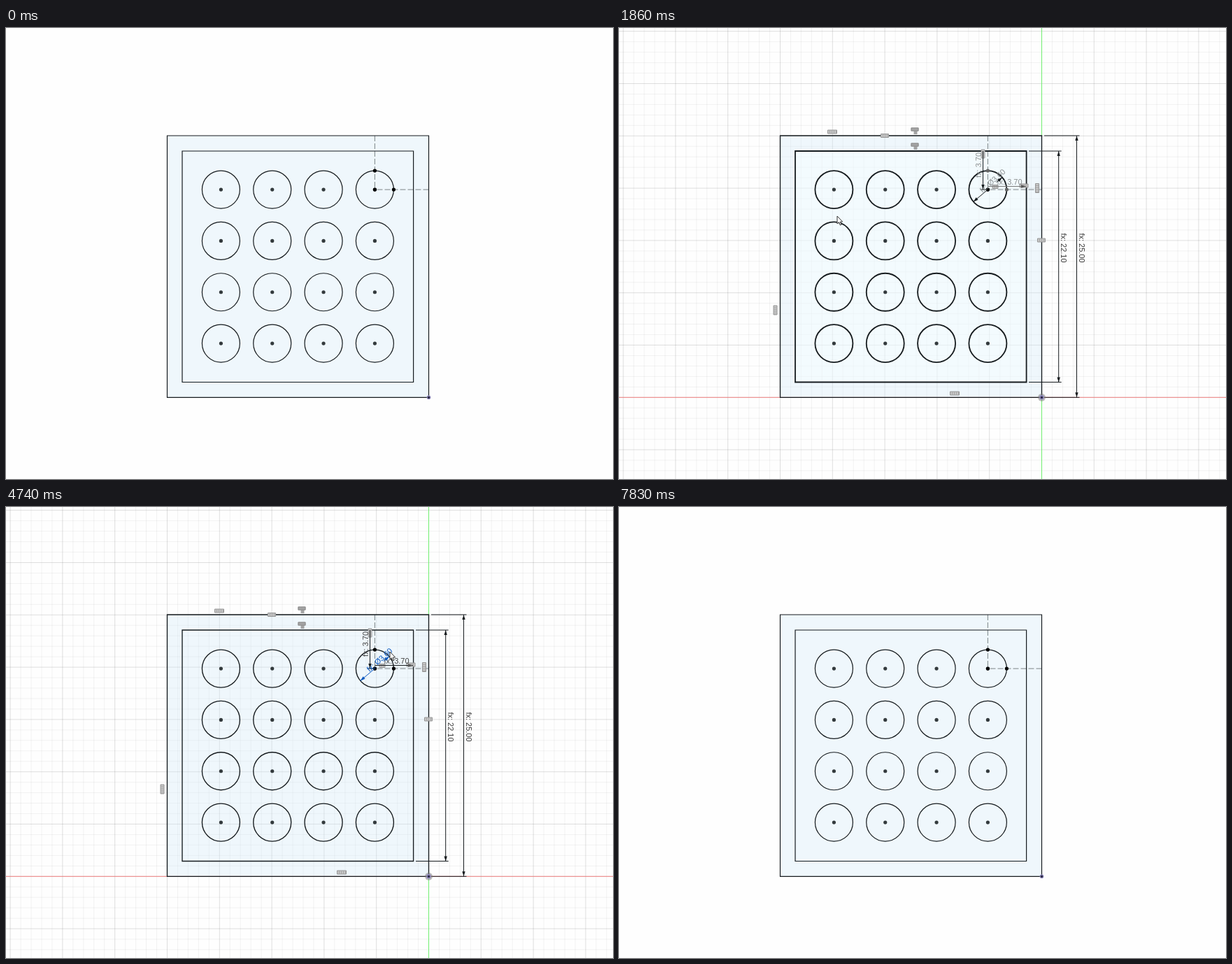
Recreate the animation shown at these times as an HTML page with a canvas. Size 868 by 645 pixels, loop 8000 ms.

```html
<!DOCTYPE html>
<html lang="en">
<head>
<meta charset="utf-8">
<title>Parametric sketch</title>
<style>
  html, body { margin: 0; width: 100%; height: 100%; overflow: hidden; background: #fefefe; }
  canvas { display: block; }
</style>
</head>
<body>
<canvas id="stage" width="868" height="645"></canvas>
<script>
const ctx = document.getElementById('stage').getContext('2d');
const LOOP = 8000, UNIT = 14.96, INK = '#161b1e', BLUE = '#2850b4';
const LEFT = 230.5, TOP = 154, RIGHT = 604.5, BOTTOM = 528.3;
const INNER = [252, 176, 330.6, 330.5];
const PITCH = 73.33, RADIUS = 27, CX = 527.4, CY = 231.1;

// Pointer path: time, x, y
const PATH = [
  [1740, 65, 296], [1800, 190, 281], [1860, 312, 269], [1980, 440, 274],
  [2160, 545, 292], [2340, 608, 308], [2510, 637, 317], [2860, 639, 317],
  [3150, 662, 314], [3440, 663, 313], [3730, 662, 312], [3900, 640, 285],
  [4140, 585, 235], [4380, 556, 212], [4560, 549, 207], [4740, 549, 207],
  [5060, 545, 216], [5330, 540, 225], [6120, 539, 225], [6180, 533, 214],
  [6700, 410, 4]
];

const between = (t, a, b) => t >= a && t < b;

function stroke(color, width) {
  ctx.strokeStyle = color;
  ctx.lineWidth = width;
  ctx.stroke();
}

function line(x1, y1, x2, y2, color, width = 1) {
  ctx.beginPath();
  ctx.moveTo(x1, y1);
  ctx.lineTo(x2, y2);
  stroke(color, width);
}

function box(x, y, w, h, color, width) {
  ctx.beginPath();
  ctx.rect(x, y, w, h);
  stroke(color, width);
}

function dot(x, y, r, color) {
  ctx.beginPath();
  ctx.arc(x, y, r, 0, 7);
  ctx.fillStyle = color;
  ctx.fill();
}

function eachHole(draw) {
  for (let row = 0; row < 4; row++)
    for (let col = 0; col < 4; col++) draw(CX - col * PITCH, CY + row * PITCH);
}

function holes(color, width) {
  eachHole((x, y) => {
    ctx.beginPath();
    ctx.arc(x, y, RADIUS, 0, 7);
    stroke(color, width);
  });
}

function guides(color, width, dash) {
  ctx.setLineDash(dash);
  line(CX, TOP, CX, CY, color, width);
  line(RIGHT, CY, CX, CY, color, width);
  ctx.setLineDash([]);
}

function placed(x, y, angle, draw) {
  ctx.save();
  ctx.translate(x, y);
  ctx.rotate(angle);
  draw();
  ctx.restore();
}

function arrow(x, y, angle, color) {
  placed(x, y, angle, () => {
    ctx.beginPath();
    ctx.moveTo(0, 0);
    ctx.lineTo(-7, 2.2);
    ctx.lineTo(-7, -2.2);
    ctx.fillStyle = color;
    ctx.fill();
  });
}

function label(text, x, y, angle, color) {
  placed(x, y, angle, () => {
    ctx.font = '11px "Liberation Sans", Arial, sans-serif';
    ctx.textAlign = 'center';
    ctx.fillStyle = color;
    ctx.fillText(text, 0, 4);
  });
}

function grid() {
  for (let i = -40; i <= 40; i++) {
    const color = i % 5 ? 'rgba(0,0,0,.05)' : 'rgba(0,0,0,.125)';
    line(RIGHT + i * UNIT, 0, RIGHT + i * UNIT, 645, color);
    line(0, BOTTOM + i * UNIT, 868, BOTTOM + i * UNIT, color);
  }
  line(0, BOTTOM, 868, BOTTOM, '#f08080');
  line(RIGHT, 0, RIGHT, 645, '#70ee70');
}

function profile(faceHover, holeColor, width) {
  ctx.fillStyle = 'rgba(209,233,245,.35)';
  ctx.fillRect(LEFT, TOP, RIGHT - LEFT, BOTTOM - TOP);
  if (faceHover) {
    ctx.fillStyle = 'rgba(248,254,255,.4)';
    ctx.fillRect(...INNER);
  }
  guides('#7c8487', 1, [8, 3]);
  box(LEFT, TOP, RIGHT - LEFT, BOTTOM - TOP, INK, width);
  const bold = faceHover ? 1.8 : width;
  box(...INNER, INK, bold);
  holes(holeColor, bold);
  eachHole((x, y) => dot(x, y, 2.6, '#333a3d'));
  dot(CX, CY, 2.6, '#000');
  const rim = faceHover ? '#666' : '#000';
  dot(CX, CY - RADIUS, 2.6, rim);
  dot(CX + RADIUS, CY, 2.6, rim);
}

function origin(r) {
  dot(RIGHT, BOTTOM, r, '#8a84b8');
  dot(RIGHT, BOTTOM, 1.6, '#26243c');
}

function selection() {
  const fill = '#78aeff', pale = '#d6e1ee';
  ctx.fillStyle = fill;
  ctx.fillRect(LEFT, TOP, RIGHT - LEFT, BOTTOM - TOP);
  box(LEFT, TOP, RIGHT - LEFT, BOTTOM - TOP, '#8ea3c4', 1.2);
  box(LEFT + 1.2, TOP + 1.4, RIGHT - LEFT - 2.4, BOTTOM - TOP - 2.8, pale, 1);
  box(...INNER, pale, 4);
  box(...INNER, fill, 1.8);
  holes(pale, 4);
  holes(fill, 1.8);
  guides(pale, 4, []);
  guides('#9cb4d6', 1, [8, 3]);
  eachHole((x, y) => dot(x, y, 2.7, '#174a96'));
  dot(CX, CY, 2, '#102040');
  dot(CX, CY - RADIUS, 2.6, '#8fa5c4');
  dot(CX + RADIUS, CY, 2.6, '#8fa5c4');
  dot(RIGHT, BOTTOM, 3, '#77799c');
}

// Constraint badge: a hatched bar
function bar(x, y, length, angle = 0) {
  placed(x, y, angle, () => {
    ctx.fillStyle = '#c6c6c6';
    ctx.fillRect(-length / 2, -2.5, length, 5);
    box(-length / 2, -2.5, length, 5, '#969696', 1);
    for (let i = 3; i < length; i += 3) line(i - length / 2, -2, i - length / 2, 2, '#a0a0a0', .8);
  });
}

function tee(x, y) {
  ctx.fillStyle = '#a4a4a4';
  ctx.fillRect(x - 5.5, y - 4.5, 11, 5);
  ctx.fillRect(x - 1.5, y, 5, 5);
  box(x - 5, y - 4, 10, 4, '#8c8c8c', 1);
}

function badges() {
  const upright = Math.PI / 2;
  bar(305, 148.5, 13);
  bar(380, 154, 11);
  bar(480, 522.5, 13);
  bar(604, 303.5, 11);
  bar(579, 225.5, 12);
  bar(223.5, 403.5, 13, upright);
  bar(598, 229, 13, upright);
  bar(520.5, 180, 12, upright);
  bar(538, 227, 8);
  tee(423, 147);
  tee(423, 169);
}

function sideDimension(text, x, y1, y2, extensionX, hover) {
  const color = hover ? BLUE : INK;
  line(extensionX, y1, x + 4, y1, color);
  line(extensionX, y2, x + 4, y2, color);
  line(x, y1, x, y2, color);
  arrow(x, y1, -Math.PI / 2, color);
  arrow(x, y2, Math.PI / 2, color);
  label(text, x + 7, 314.5, Math.PI / 2, hover ? BLUE : '#3a3a3a');
}

function holeDimensions(faded, hover) {
  const color = hover ? '#0a58c0' : INK, tilt = -0.7;
  const dx = RADIUS * Math.cos(tilt), dy = RADIUS * Math.sin(tilt);
  const text = faded ? '#8c9092' : '#444';
  line(520.5, 176, 520.5, CY, INK);
  arrow(520.5, CY, Math.PI / 2, INK);
  line(517, CY, CX, CY, INK);
  line(CX, 226.5, 582, 226.5, faded ? '#777' : INK);
  arrow(582, 226.5, 0, '#555');
  label('fx: 3.70', 514, 196, -Math.PI / 2, text);
  label('fx: 3.70', 558.5, 219.5, 0, text);
  line(CX - dx, CY - dy, CX, CY, color);
  line(CX + dx * .6, CY + dy * .6, CX + dx, CY + dy, color);
  arrow(CX - dx, CY - dy, tilt + Math.PI, color);
  arrow(CX + dx, CY + dy, tilt, color);
  label('fx: Ø3.60', 534, 218.5, tilt - .03, hover ? color : text);
}

function pointer(t) {
  if (!between(t, 1740, 6700)) return;
  t = 1740 + Math.floor((t - 1740) / 60) * 60;
  const next = PATH.findIndex(p => p[0] > t);
  const [t0, x0, y0] = PATH[next - 1], [t1, x1, y1] = PATH[next];
  const k = (t - t0) / (t1 - t0);
  placed(x0 + (x1 - x0) * k, y0 + (y1 - y0) * k, 0, () => {
    ctx.beginPath();
    for (const [x, y] of [[0, 0], [0, 11], [2.5, 8.8], [4.3, 13], [6, 12.2], [4.3, 8.2], [7.6, 8]]) ctx.lineTo(x, y);
    ctx.closePath();
    ctx.fillStyle = '#fff';
    ctx.fill();
    stroke('#333', 1);
  });
}

function editor(t) {
  const faceHover = between(t, 1860, 2280) || between(t, 4140, 4200) || between(t, 6300, 6360);
  const holesHover = between(t, 4200, 4320) || between(t, 5220, 6300);
  grid();
  profile(faceHover, holesHover ? '#20448c' : INK, 1.35);
  badges();
  sideDimension('fx: 22.10', 628.7, 176, 506.5, 586, between(t, 2460, 3050));
  sideDimension('fx: 25.00', 654.5, TOP, BOTTOM, 608, between(t, 3050, 3840));
  holeDimensions(faceHover, between(t, 4560, 6300));
  dot(RIGHT, BOTTOM, 5.5, 'rgba(120,120,120,.5)');
  origin(3.2);
  pointer(t);
}

function render(t) {
  ctx.fillStyle = '#fefefe';
  ctx.fillRect(0, 0, 868, 645);
  if (between(t, 960, 7320)) return editor(t);
  profile(false, INK, 1.2);
  origin(2.8);
  if (between(t, 500, 960)) {
    ctx.globalAlpha = t < 690 ? .5 : 1;
    selection();
    ctx.globalAlpha = 1;
  }
}

const start = performance.now();
function tick() {
  render((performance.now() - start) % LOOP);
  requestAnimationFrame(tick);
}
tick();
</script>
</body>
</html>
```
